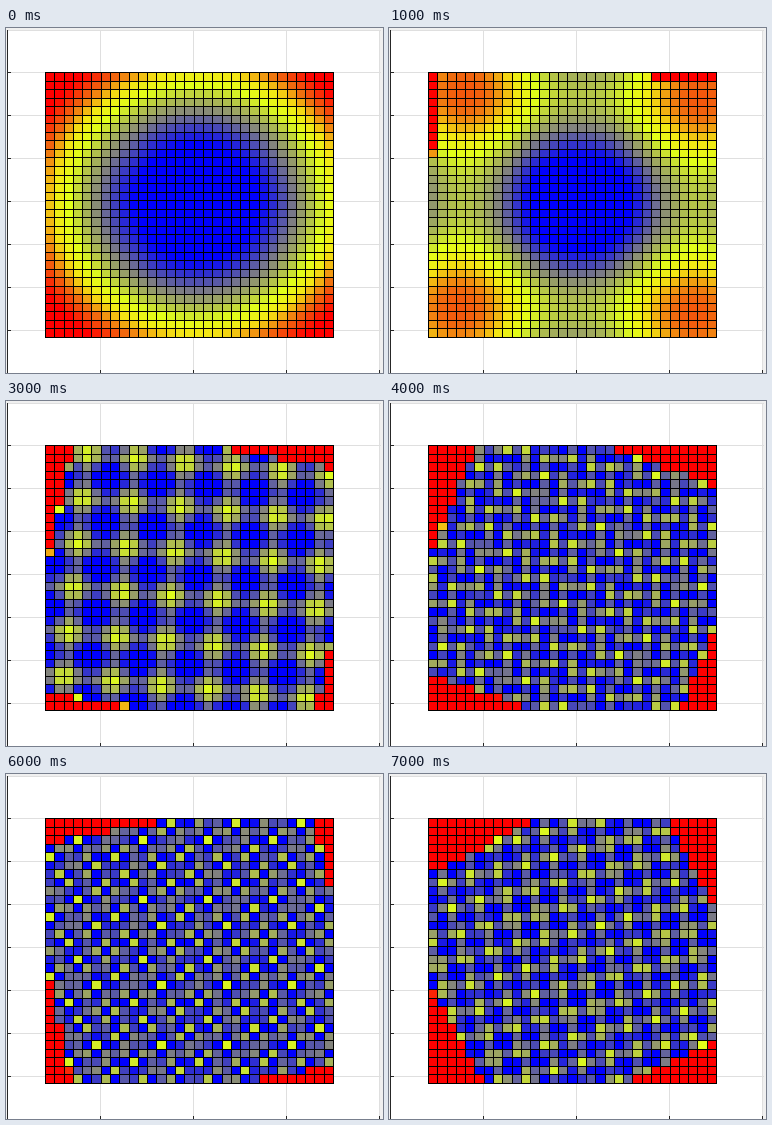
Write a matplotlib script that moves like this. It is 377x345 px and loops after 8 s.

```python
import numpy as np
import matplotlib.pyplot as plt
from matplotlib.animation import FuncAnimation

W, H, DPI = 377, 345, 64
N = 31
LEFT, RIGHT, TOP, BOTTOM = 39, 327, 44, 309
PX = 72 / DPI  # one pixel in points
LIMIT = 1.587  # half side of the turning square

# Energy and colour of each stop, from rest to escape
STOPS = [
    (0.45, "#0000ff"), (1.1, "#808080"), (1.9, "#e1ff19"),
    (2.35, "#f3e614"), (2.9, "#f06c0f"), (3.7, "#ff0000"),
]
LEVELS = [level for level, _ in STOPS]
CHANNELS = np.array([plt.matplotlib.colors.to_rgb(c) for _, c in STOPS]).T

steps = 0.1 * np.arange(N)
X, Y = np.meshgrid(-1.545 + steps, 1.535 - steps)


def rotate(x, y, degrees):
    a = np.radians(degrees)
    return x * np.cos(a) - y * np.sin(a), x * np.sin(a) + y * np.cos(a)


def ripple(x, period):
    return np.abs(np.sin(np.pi * x / period)) ** 2.6


def field(step):
    """Energy of every cell: a bowl that folds into ever finer waves."""
    x, y = X - 0.035, Y - 0.06
    if step == 0:
        return x**2 + y**2
    turn = 1.55 * 1.925**step
    period = 2.53 * 0.455**(step - 1)
    height = 0.93 + 0.6 * 8.0**(1 - step)
    u, v = rotate(x, y, turn / 2)
    energy = height * (ripple(u, period) + ripple(v, period))
    u, v = rotate(X, Y, turn)
    reach = np.maximum(abs(u), abs(v))
    return energy + np.interp(reach, [LIMIT - 0.015, LIMIT], [0, 4])


def paint(energy):
    return np.stack([np.interp(energy, LEVELS, c) for c in CHANNELS], axis=-1)


def rule(xs, ys, color, z):
    """One-pixel line; whole coordinates snap to that pixel."""
    ax.plot(xs, ys, color=color, lw=PX, antialiased=False, zorder=z,
            solid_capstyle="butt")


fig = plt.figure(figsize=(W / DPI, H / DPI), dpi=DPI, facecolor="#f0f0f0")
ax = fig.add_axes([0, 0, 1, 1])
ax.axis("off")

# Plot area with its grid and ticks
ax.add_patch(plt.Rectangle((1, 2), 373, H - 2, fc="white", ec="none", zorder=0))
rule([1, 374], [2, 2], "#dfdfdf", 1)
for gx in range(94, 374, 93):
    rule([gx, gx], [2, H], "#dfdfdf", 1)
    rule([gx, gx], [H - 3, H], "#262626", 2)
for gy in range(44, 303, 43):
    rule([1, 374], [gy, gy], "#dfdfdf", 1)
    rule([1, 4], [gy, gy], "#262626", 2)
rule([1, 1], [2, H], "#262626", 2)

# Coloured cells and their black outlines
xe = np.round(np.linspace(LEFT, RIGHT, N + 1))
ye = np.round(np.linspace(TOP, BOTTOM, N + 1))
mesh = ax.pcolormesh(xe, ye, paint(field(0)), zorder=3)
for x in xe:
    rule([x, x], [TOP, BOTTOM], "black", 4)
for y in ye:
    rule([LEFT, RIGHT], [y, y], "black", 4)
ax.set_xlim(0, W)
ax.set_ylim(H, 0)


def update(step):
    mesh.set_array(paint(field(step)))
    return [mesh]


anim = FuncAnimation(fig, update, frames=8, interval=1000, repeat=True,
                     repeat_delay=0, blit=False)
plt.show()
```
